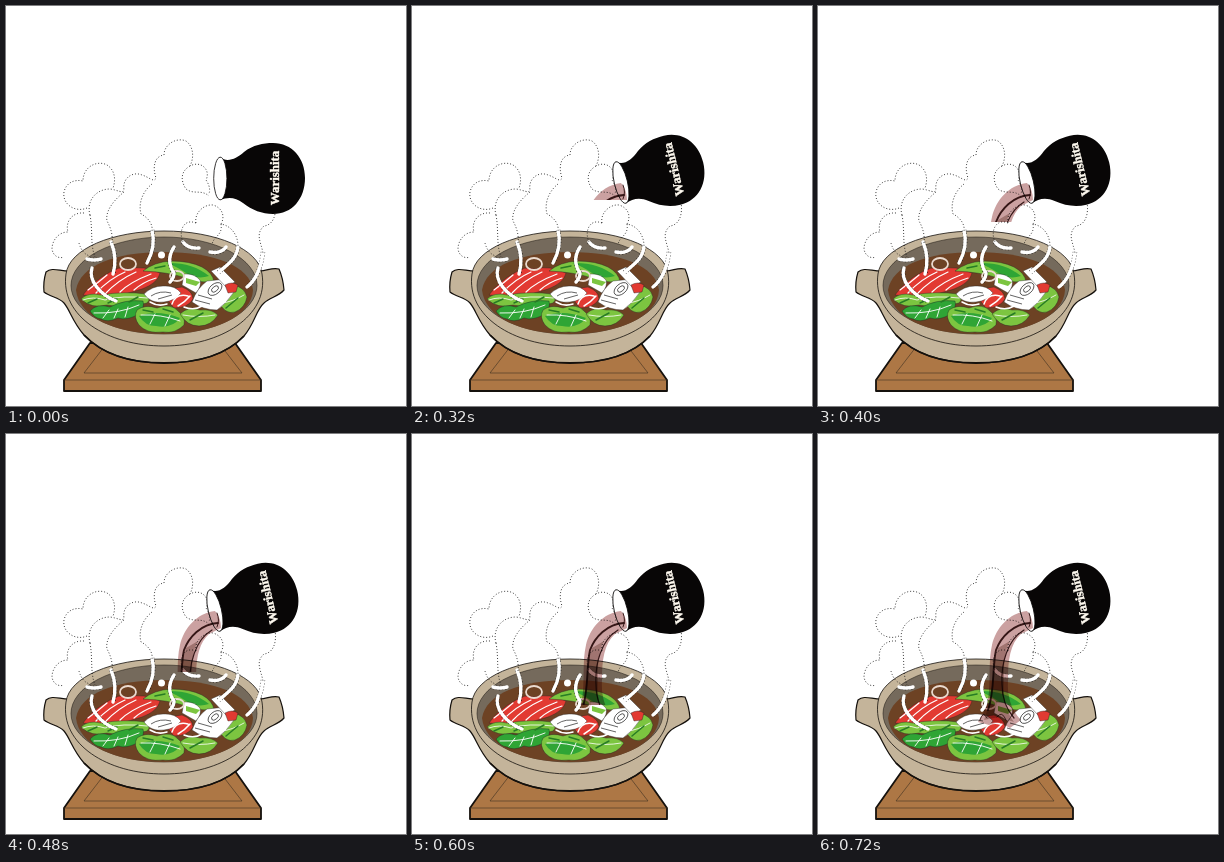
Animation, 400 px wide and 400 px high, one loop 0.8 s. Source, as an HTML page:

```html
<!DOCTYPE html>
<html lang="en">
<head>
<meta charset="utf-8">
<title>Hot pot</title>
<style>
  html, body { margin: 0; width: 100%; height: 100%; overflow: hidden; background: #fff; }
  svg { display: block; width: 100%; height: 100%; }
  .ink { stroke: #15110d; stroke-linejoin: round; }
  .food { stroke: #222; stroke-width: .4; stroke-linejoin: round; }
  .line { fill: none; stroke-linecap: round; }
  .dots { fill: none; stroke: #111; stroke-width: .8; stroke-dasharray: 1 2; }
  .red { fill: #e23a32; }
  .lime { fill: #7cc540; }
  .green { fill: #2fa535; }
  .white { fill: #fff; }
  #pour { mix-blend-mode: multiply; }
  text { font: bold 12.9px "Liberation Serif", serif; fill: #fffaf0; stroke: #fffaf0; stroke-width: .45; text-anchor: middle; }
</style>
</head>
<body>
<svg viewBox="0 0 400 400">
  <defs>
    <clipPath id="reveal"><rect id="level" x="150" y="165" width="70" height="0"/></clipPath>
    <g id="wisps">
      <path d="M81 253Q88 255 95 253M86 262C82 274 94 289 110 295"/>
      <path d="M105 236C110 248 110 258 107 268M146 224C149 236 146 248 141 257"/>
      <path d="M168 241C160 253 165 263 168 267Q168 272 164 276"/>
      <path d="M177 236Q182 243 193 242M204 246Q215 248 220 241"/>
      <path d="M232 240C231 254 220 259 212 267M257 246C255 262 250 274 241 281"/>
    </g>
  </defs>

  <!-- stand -->
  <g class="ink" fill="#ad7745">
    <path d="M84 337H229L255 374V385H58V374Z" stroke-width="1.8"/>
    <path d="M58 374H255M98 341L78 367H236L216 341" fill="none" stroke="#3d3020" stroke-width=".6"/>
  </g>

  <!-- pot -->
  <g class="ink" fill="#c4b49a">
    <path d="M63 265C53 265 46 261 40 266Q37 276 38 286C44 291 53 291 58 297C64 304 66 315 78 329C98 350 128 357 158 357C190 357 219 350 238 330C249 317 250 304 258 297C264 291 272 291 278 284Q277 272 273 263C266 261 261 265 254 265Z" stroke-width="1.2"/>
    <path d="M78 329C98 350 128 357 158 357C190 357 219 350 238 330" fill="none" stroke-width="1.8"/>
    <path d="M60 268C63 243 106 225 158 225S253 243 256 268C263 310 215 340 158 340S54 310 60 268Z" stroke-width=".8"/>
    <ellipse cx="158" cy="279.5" rx="93" ry="48.5" fill="#756a5c" stroke-width=".5"/>
    <path d="M70 284C74 260 108 246 158 246S244 260 247 284C246 310 208 328 158 328S73 311 70 284Z" fill="#6d4224" stroke="none"/>
  </g>

  <!-- ingredients -->
  <g class="food">
    <path class="red" d="M77 289Q86 276 104 266Q112 260 122 263Q138 259 154 267Q152 277 136 283Q108 293 77 289Z"/>
    <path class="lime" d="M137 265Q148 256 165 255Q184 255 196 261Q207 267 208 276Q193 277 180 272Q162 266 137 265Z"/>
    <path class="green" d="M160 257Q186 256 203 270Q191 274 180 267Q170 260 160 257Z" stroke="none"/>
    <path class="white" d="M178 268Q188 267 194 274Q196 280 190 287L176 279Z"/>
    <path class="lime" d="M180 272L194 276L190 280L180 277Z" stroke="none"/>
    <path class="red" d="M160 292Q164 281 176 281Q187 285 187 293Q182 302 168 302Z"/>
    <path class="lime" d="M75 293Q82 286 95 289Q118 285 140 288Q146 292 141 297Q121 303 101 299Q85 303 75 293Z"/>
    <path class="green" d="M84 305Q91 297 104 301Q119 293 137 295Q139 301 133 308Q121 315 112 312Q102 317 95 313Q88 312 84 305Z"/>
    <path class="lime" d="M131 304Q139 298 151 302Q165 297 172 305Q180 311 178 319Q169 328 157 326Q141 328 133 319Q127 311 131 304Z"/>
    <path class="green" d="M133 310Q151 303 174 312Q166 323 150 320Q139 320 133 310Z" stroke="none"/>
    <path class="lime" d="M174 308Q182 300 194 304Q206 303 212 309Q205 320 193 320Q181 320 174 308Z"/>
    <path class="lime" d="M212 295Q218 281 228 279Q239 282 241 291Q239 302 229 306Q219 309 212 295Z"/>
    <path class="white" d="M138 288Q146 280 157 280Q169 279 175 287Q169 295 158 296Q145 298 138 288Z"/>
    <path class="white" d="M186 296Q191 282 201 275L220 273Q228 279 228 286Q220 298 211 304Q197 304 186 296Z"/>
    <path class="white" d="M205 265L214 261L229 276L220 281Z"/>
    <path class="red" d="M219 279Q226 275 232 279L230 286L222 287Z"/>
    <g fill="none" stroke-width=".7">
      <ellipse cx="209" cy="283" rx="8" ry="5" transform="rotate(-40 209 283)"/>
      <ellipse cx="209" cy="283" rx="4" ry="2.4" transform="rotate(-40 209 283)"/>
      <path d="M189 294L204 298M192 289L206 293M145 290Q154 284 165 287M152 293L166 289"/>
    </g>
  </g>
  <g class="line" stroke="#fff" stroke-width="1.2">
    <path d="M82 284Q93 276 101 269M90 287Q103 273 119 266M99 288Q112 274 130 266M114 286Q124 276 145 268M128 284Q137 276 150 272"/>
    <path d="M88 307Q113 308 133 299M97 312L103 304M108 312L112 303M119 311L122 301M135 309Q155 308 174 315M144 318L149 308M159 320L164 309" stroke-width=".9"/>
    <path d="M77 294Q87 290 99 294Q116 289 141 292M177 309Q193 312 209 309M216 297Q226 296 238 289" stroke-width=".8"/>
    <path d="M166 298Q170 287 182 290M172 300Q179 296 184 290M144 296Q152 301 161 298M178 301Q188 305 196 300" stroke-width="1.5"/>
    <g stroke="#eadbd0" stroke-width="1.8">
      <ellipse cx="122" cy="258" rx="8" ry="6"/>
      <ellipse cx="171" cy="270" rx="7" ry="5"/>
    </g>
  </g>
  <path class="line" d="M82 297L91 293M102 297L111 293M123 296L132 291M137 304L147 306M157 303L167 306M184 314L197 307M220 302L232 292M149 262L159 260" stroke="#277c25" stroke-width="1.5"/>

  <!-- steam -->
  <use href="#wisps" class="line" stroke="#111" stroke-width="4.4" stroke-dasharray="1 2" style="stroke-linecap:butt"/>
  <use href="#wisps" class="line" stroke="#fff" stroke-width="3.4"/>
  <circle cx="155.5" cy="249" r="3.5" fill="#fff"/>
  <g class="dots">
    <path d="M81 202C69 207 56 198 58 186C60 177 68 173 77 175C77 160 92 154 101 159C109 164 110 174 107 182"/>
    <path d="M78 207C66 206 59 216 62 226C52 226 46 235 46 243C47 250 53 253 58 251M73 237Q76 248 84 250"/>
    <path d="M84 209C80 195 90 183 104 183C112 184 117 188 118 184C116 172 127 165 136 169C143 171 148 177 150 172C146 160 149 150 158 149C158 138 171 131 180 135C188 141 188 152 184 160C195 154 205 164 200 174C205 181 204 188 202 188"/>
    <path d="M84 209C87 225 84 238 89 251M118 186C108 194 99 205 101 215C105 222 107 230 106 237"/>
    <path d="M146 178C137 185 132 197 135 208C143 212 147 219 146 225M184 160C175 165 174 174 180 183C188 189 195 183 203 190"/>
    <path d="M190 217C188 207 198 198 207 199C217 202 219 211 215 218C226 220 232 230 232 240M190 217C178 212 172 225 177 236M215 218C217 230 207 230 206 239"/>
    <path d="M269 196C271 209 267 219 258 220C249 228 255 236 257 247"/>
  </g>

  <!-- jug -->
  <g id="jug">
    <path d="M214 151C221 157 230 153 238 146C247 139 257 137 267 137C286 137 299 152 299 172C299 193 286 208 267 208C256 208 246 204 237 197C229 191 222 191 214 194Z" fill="#080606"/>
    <ellipse cx="214.3" cy="172.5" rx="6.6" ry="21.3" fill="#fff" stroke="#080606" stroke-width=".8"/>
    <text transform="translate(273 172) rotate(-90)">Warishita</text>
  </g>

  <!-- sauce -->
  <g id="pour" clip-path="url(#reveal)">
    <path d="M209 177C191 179 178 194 174 211C170 228 173 247 170 266C168 276 163 282 160 288L171 291L181 288L192 294L203 286C193 276 189 262 190 246C190 226 192 210 203 200L215 194Q215 184 209 177Z" fill="#cba1a1"/>
    <path d="M180 214C174 230 177 250 172 268L166 286L181 283L196 288C187 276 185 263 186 246C186 228 186 218 192 207Z" fill="#a07470"/>
    <g class="line" stroke="#351616">
      <path d="M212 189C195 190 183 203 178 216C174 235 177 256 170 276" stroke-width="1.9"/>
      <path d="M211 179Q214 186 211 193" stroke-width="1"/>
      <path d="M206 196C189 206 183 230 184 250C184 263 188 275 196 284" stroke-width="1.2"/>
      <path d="M162 286Q165 276 169 284M179 283Q184 276 188 286" stroke-width=".9"/>
    </g>
  </g>
</svg>
<script>
  const LOOP = 800, TILT_AT = 240, STEP = 40, DROP = 11;
  const jug = document.getElementById("jug");
  const level = document.getElementById("level");

  function draw(now) {
    const time = now % LOOP;
    const step = Math.min(12, Math.floor((time - TILT_AT) / STEP));
    const tilted = step >= 0;
    jug.setAttribute("transform", tilted ? "translate(261 163.5) rotate(-13.5) translate(-268 -172)" : "");
    level.setAttribute("height", step > 0 ? 7 + DROP * step : 0);
    requestAnimationFrame(draw);
  }
  draw(performance.now());
</script>
</body>
</html>
```
